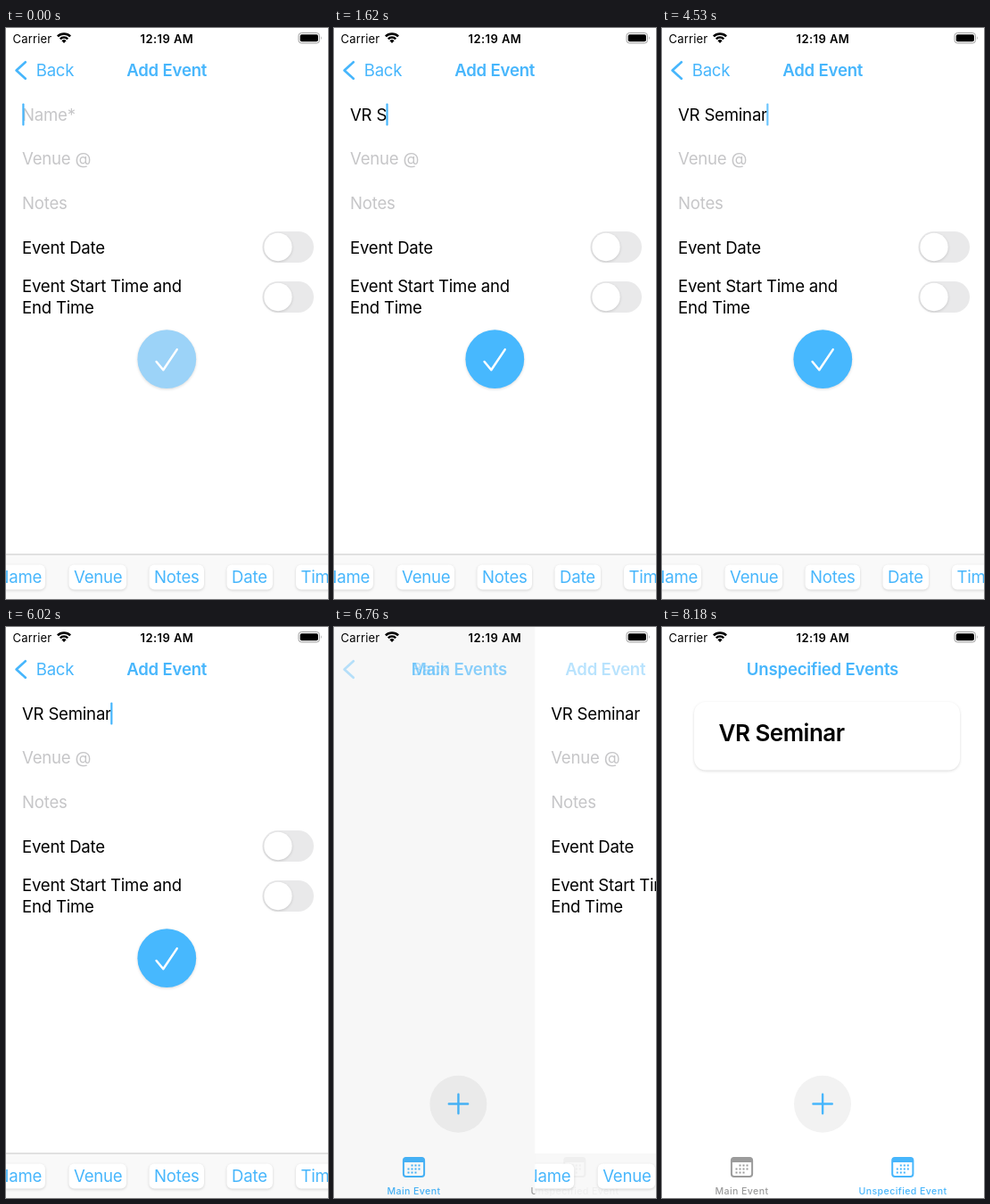
Write an HTML page that moves like this. It is 361x640 px and loops after 8210 ms.

```html
<!DOCTYPE html>
<html lang="en">
<head>
<meta charset="utf-8">
<title>Add Event</title>
<style>
  html, body { margin: 0; width: 100%; height: 100%; overflow: hidden; background: #fff; }
  svg { display: block; width: 100vw; height: 100vh; --blue: #47b6fc; }
  text { font: 400 18.6px Inter, sans-serif; letter-spacing: -.21px; white-space: pre; }
  .blue { fill: var(--blue); }
  .line { fill: none; stroke: var(--blue); stroke-linecap: round; stroke-linejoin: round; }
  .hint { fill: #c6c6c8; }
  .title { font-weight: 600; letter-spacing: -.2px; fill: var(--blue); }
  .mid { text-anchor: middle; }
  .status { font-size: 13px; letter-spacing: .2px; }
  .clock { font-weight: 600; letter-spacing: .42px; }
  .tab text { font-size: 10.6px; font-weight: 500; letter-spacing: .4px; }
  .tab { fill: currentColor; }
  .soft { filter: drop-shadow(0 1px 1.5px rgba(0, 0, 0, .15)); }
  #cardName { font-size: 26px; font-weight: 600; letter-spacing: -.5px; }
</style>
</head>
<body>
<svg viewBox="0 0 361 640">
  <defs>
    <clipPath id="pageClip"><rect width="361" height="640"/></clipPath>
    <g id="toggle">
      <rect x="287.5" width="57.5" height="35" rx="17.5" fill="#e9e9ea"/>
      <circle class="soft" cx="305" cy="17.5" r="15.7" fill="#fff"/>
    </g>
    <g id="calendar">
      <rect x="-11.6" y="-10.6" width="23.2" height="21.2" rx="3" fill="none" stroke="currentColor" stroke-width="2"/>
      <path d="M-11.6 -5.5v-3q0-2.5 3-2.5h17.2q3 0 3 2.5v3z"/>
      <path d="M-3 -2h10M-7 2h14M-7 6h10" fill="none" stroke="currentColor" stroke-width="1.9" stroke-dasharray="2 2"/>
    </g>
  </defs>

  <rect width="361" height="640" fill="#fff"/>

  <g id="home">
    <circle cx="180" cy="534.8" r="32" fill="#f2f2f2"/>
    <path class="line" stroke-width="2.4" d="M169.4 534.5h21.4M180.1 523.8v21.4"/>
  </g>
  <g id="card">
    <rect class="soft" x="36" y="84" width="298" height="76.5" rx="13" fill="#fff"/>
    <text id="cardName" x="63.5" y="128">VR Seminar</text>
  </g>
  <g class="tab" id="tabMain">
    <use href="#calendar" x="89.5" y="605.5"/>
    <text class="mid" x="89.5" y="635.5">Main Event</text>
  </g>
  <g class="tab" id="tabOther">
    <use href="#calendar" x="269.8" y="605.5"/>
    <text class="mid" x="270" y="635.5">Unspecified Event</text>
  </g>
  <rect id="dim" width="361" height="640"/>

  <g id="page" clip-path="url(#pageClip)">
    <rect width="361" height="590" fill="#fff"/>
    <rect id="rowGlow" y="332" width="360" height="78.5" fill="#d4d4d8"/>
    <text id="name" x="18" y="103.7"></text>
    <rect id="caret" class="blue" y="84.5" width="2.2" height="25" rx="1"/>
    <text class="hint" x="18" y="153.3">Venue @</text>
    <text class="hint" x="18" y="203">Notes</text>
    <text x="18" y="252.5">Event Date</text>
    <text x="18" y="295.5">Event Start Time and</text>
    <text x="18" y="320">End Time</text>
    <use href="#toggle" y="228"/>
    <use href="#toggle" y="284"/>
    <circle id="done" class="soft" cx="180.3" cy="371.2" r="32.9"/>
    <path d="M168.6 374l7.7 9.3L191.7 360.4" fill="none" stroke="#fff" stroke-width="2.5" stroke-linecap="round" stroke-linejoin="round"/>
    <rect id="barFill" y="590" width="361" height="50" fill="#f9f9f9"/>
    <path id="barLine" d="M0 590h361" stroke="#c6c6c6"/>
    <g id="chips"></g>
  </g>

  <g id="backMark"><path class="line" stroke-width="2.7" d="M21.8 38.3L11.6 47.5l10.200 9.200"/></g>
  <text id="back" class="blue" y="54">Back</text>
  <text id="addTitle" class="title mid" y="54">Add Event</text>
  <text id="mainTitle" class="title" y="54">Main Events</text>
  <text id="otherTitle" class="title mid" x="180" y="54">Unspecified Events</text>

  <text class="status" x="7.5" y="16.5">Carrier</text>
  <text class="status clock mid" x="180.4" y="16.5">12:19 AM</text>
  <g fill="none" stroke="#000" stroke-width="2.5">
    <path d="M57.9 9.4a10 10 0 0 1 14.2 0M60.8 12.3a6 6 0 0 1 8.4 0"/>
    <path d="M65 17l-2.6-2.7a3.7 3.7 0 0 1 5.2 0z" fill="#000" stroke="none"/>
  </g>
  <rect x="328" y="5.5" width="23.5" height="11.5" rx="3.3" fill="none" stroke="#a0a0a0"/>
  <rect x="329.7" y="7.2" width="20.2" height="8.1" rx="1.8"/>
  <path d="M353 9.3q1.8 2 0 4z" fill="#a0a0a0"/>
</svg>
<script>
const LOOP = 8210;
const SELECT = 6530, CLOSE = 6647, CLOSED = 7210, SWITCH = 8180;
const NAME = 'VR Seminar';
// [time, letters typed]
const TYPING = [[0, 0], [1130, 2], [1350, 3], [1620, 4], [1820, 5], [2180, 6],
  [2440, 7], [2720, 8], [2900, 9], [3010, 10]];
// [time, caret opacity]
const BLINK = [[0, 1], [510, .5], [630, 0], [880, 1], [3520, .5], [3630, 0], [4020, 1],
  [4530, .8], [4650, 0], [4890, .6], [5000, 1], [5540, .6], [5660, 0], [5900, .6],
  [6020, 1], [6650, 0]];
// times at which the slide is redrawn
const SLIDE = [0, 6650, 6760, 6870, 6990, 7100];

const $ = id => document.getElementById(id);
const set = (id, attr, value) => $(id).setAttribute(attr, value);
const show = (id, on) => set(id, 'opacity', +on);
const at = (steps, t) => steps.findLast(s => s[0] <= t)[1];
const move = (id, x) => set(id, 'transform', `translate(${x.toFixed(2)} 0)`);

const chips = [['Name', -16, 60], ['Venue', 70.5, 64.5], ['Notes', 160.5, 61.5],
  ['Date', 247.5, 51.5], ['Time', 325, 56]];
$('chips').innerHTML = chips.map(([label, x, w]) => `
  <rect class="soft" x="${x}" y="601.5" width="${w}" height="28" rx="6" fill="#fff"/>
  <text class="blue" x="${x + 5.5}" y="622">${label}</text>`).join('');

// critically damped spring, 0 to 1
function spring(t) {
  const u = Math.max(0, t - CLOSE) / 1000 * 18.7;
  return 1 - (1 + u) * Math.exp(-u);
}

function drawForm(t) {
  const typed = NAME.slice(0, at(TYPING, t));
  const name = $('name');
  name.textContent = typed || 'Name*';
  name.setAttribute('class', typed ? '' : 'hint');
  set('caret', 'x', 18.3 + (typed ? name.getComputedTextLength() - 1 : 0));
  set('caret', 'opacity', at(BLINK, t));
  set('done', 'fill', typed ? '#47b8fe' : '#9cd3f8');
  show('rowGlow', t >= SELECT && t < 6760);
  const moving = t >= 6650;
  show('barLine', !moving);
  set('barFill', 'opacity', moving ? .9 : 1);
}

function drawSlide(p) {
  move('page', 361 * p);
  move('home', -108 * (1 - p));
  set('dim', 'opacity', .085 * (1 - p));
  const left = 33.7 + 92 * p ** 1.17;
  set('back', 'x', left);
  set('mainTitle', 'x', left);
  set('addTitle', 'x', 180.2 + 199 * p);
  for (const id of ['back', 'backMark', 'addTitle']) set(id, 'opacity', 1 - p);
}

function draw(t) {
  const closed = t >= CLOSED, other = t >= SWITCH;
  const p = closed ? 1 : spring(SLIDE.findLast(s => s <= t));
  drawForm(t);
  drawSlide(p);
  set('page', 'visibility', closed ? 'hidden' : 'visible');
  set('mainTitle', 'opacity', other ? 0 : p);
  show('otherTitle', other);
  show('card', other);
  set('tabMain', 'color', other ? '#9b9b9b' : '#47b6fc');
  set('tabOther', 'color', other ? '#47b6fc' : '#9b9b9b');
}

const start = performance.now();
function tick() {
  draw((performance.now() - start) % LOOP);
  requestAnimationFrame(tick);
}
tick();
</script>
</body>
</html>
```
